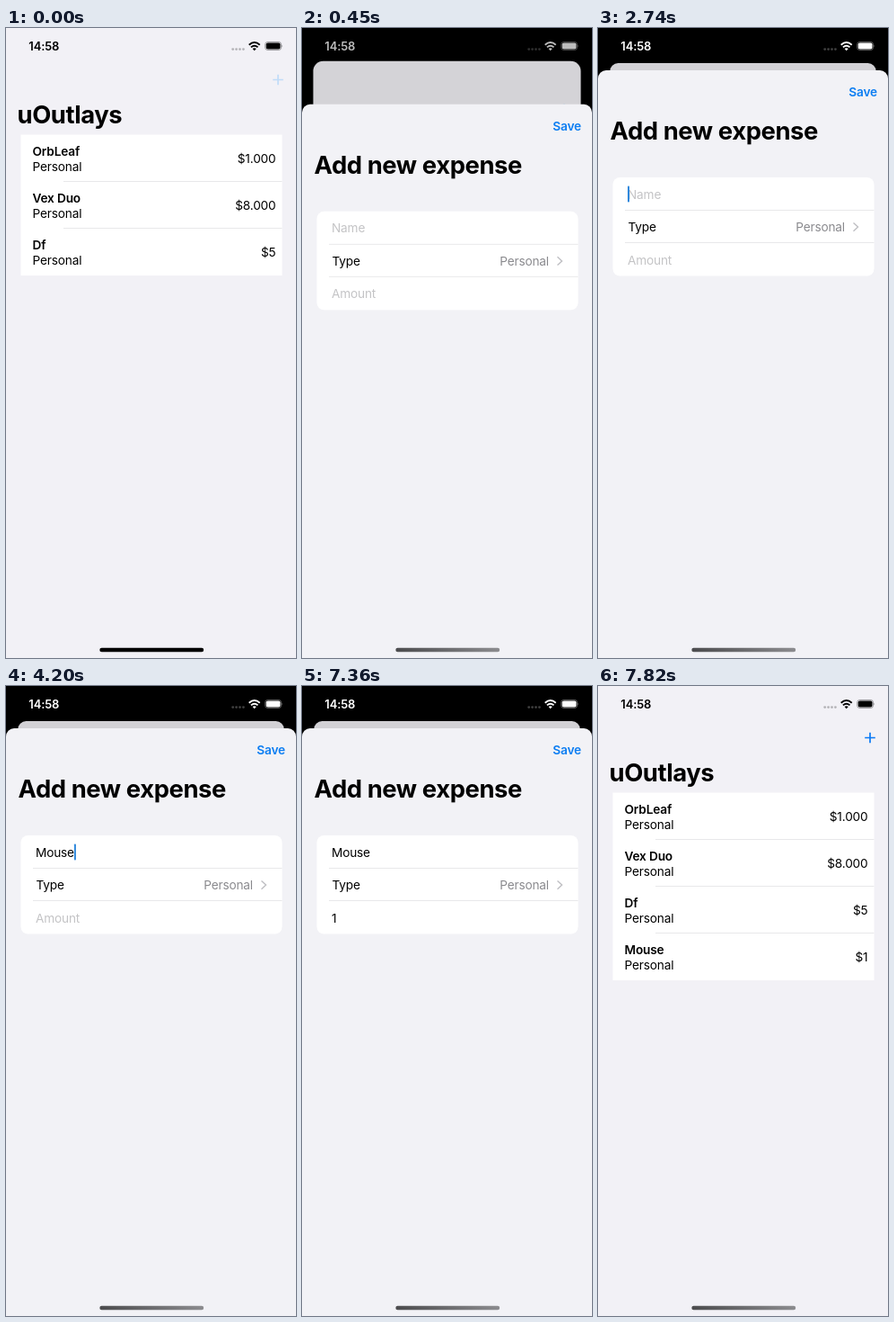
Recreate the animation shown at these times as an HTML page. Size 323 by 700 pixels, loop 8000 ms.

```html
<!DOCTYPE html>
<html lang="en">
<head>
<meta charset="utf-8">
<title>Expense list</title>
<style>
  html, body { margin: 0; width: 100%; height: 100%; overflow: hidden; background: #000; }
  svg { display: block; width: 323px; height: 700px; }
  text {
    font: 13.65px Inter, "Open Sans", sans-serif;
    font-optical-sizing: none;
    letter-spacing: -.012em;
  }
  .title { font-size: 27.4px; font-weight: 700; letter-spacing: -.015em; }
  .bold { font-weight: 600; }
  .end { text-anchor: end; }
  .hint { fill: #c4c4c6; }
  .line { stroke: #e8e8ea; fill: none; }
</style>
</head>
<body>
<svg viewBox="0 0 323 700">
  <defs>
    <linearGradient id="grey">
      <stop offset="0" stop-color="#4c4c4e"/>
      <stop offset="1" stop-color="#8c8c8f"/>
    </linearGradient>
  </defs>

  <g id="list">
    <rect id="page" width="323" height="760" fill="#f2f1f6"/>
    <path id="plus" d="M297.2 57.5h11.6M303 51.7v11.6" stroke-width="1.7"/>
    <text class="title" x="12.5" y="106">uOutlays</text>
    <rect id="table" x="16.5" y="118.5" width="291" fill="#fff"/>
    <g id="rows"></g>
  </g>
  <rect id="dim" width="323" height="700"/>

  <g id="sheet">
    <rect y="47" width="323" height="700" rx="9" fill="#f2f2f6"/>
    <text id="save" class="bold end" x="311" y="76" fill="#0b7df2">Save</text>
    <text class="title" x="13.5" y="124">Add new expense</text>
    <rect x="16.5" y="166" width="291" height="109.5" rx="8" fill="#fff"/>
    <path class="line" d="M30 202.5H307.5M30 238.5H307.5"/>
    <text id="name" x="33" y="189.5"></text>
    <text x="33.5" y="226">Type</text>
    <text class="end" x="275" y="226" fill="#8a8a8e">Personal</text>
    <path d="M284.5 216.5l5 4.6l-5 4.6" fill="none" stroke="#bfbfc3" stroke-width="1.4"/>
    <text id="amount" x="33" y="262.5"></text>
    <rect id="caret" width="2" height="18" rx=".8" fill="#2f88dc"/>
  </g>

  <g id="status">
    <text class="bold" x="25.3" y="25" style="font-size:13px">14:58</text>
    <g opacity=".25">
      <circle cx="252.7" cy="23.6" r="1.4"/><circle cx="256.6" cy="23.6" r="1.4"/>
      <circle cx="260.5" cy="23.6" r="1.4"/><circle cx="264.4" cy="23.6" r="1.4"/>
    </g>
    <g fill="none" stroke="currentColor" stroke-width="1.9">
      <path d="M270.7 18.8Q276.7 13.4 282.7 18.8M272.9 21.4Q276.7 18 280.5 21.4"/>
    </g>
    <path d="M274.6 23Q276.7 21.3 278.8 23L276.7 25.2Z"/>
    <rect x="288.7" y="15.5" width="17.8" height="9" rx="2.8" fill="none" stroke="currentColor" stroke-width=".8" opacity=".45"/>
    <rect x="289.7" y="16.5" width="15.8" height="7" rx="1.8"/>
    <path d="M307.4 18.6q1.4 1.4 0 2.8z" opacity=".45"/>
  </g>

  <rect id="home" x="104.3" y="688.8" width="115.9" height="4.4" rx="2.2"/>
</svg>

<script>
const LOOP = 8000, FRAME = 55, ROW = 52;
const $ = id => document.getElementById(id);
const clamp = v => Math.min(1, Math.max(0, v));
const set = (id, attrs) => {
  for (const key in attrs) $(id).setAttribute(key, attrs[key]);
};

const items = [["OrbLeaf", "$1.000"], ["Vex Duo", "$8.000"], ["Df", "$5"], ["Mouse", "$1"]];
$("rows").innerHTML = items.map(([name, price], i) => `
  <g id="row${i}" transform="translate(0 ${i * ROW})">
    ${i ? `<path id="line${i}" class="line" d="M64 118.5H307.5"/>` : ""}
    <text class="bold" x="29.5" y="141.5">${name}</text>
    <text x="29.5" y="158.5">Personal</text>
    <text class="end" x="300.5" y="150">${price}</text>
  </g>`).join("");

// Times at which text and caret opacity change
const nameKeys = [[0, ""], [3200, "M"], [3410, "Mo"], [3590, "Mou"], [3990, "Mous"], [4200, "Mouse"]];
const amountKeys = [[0, ""], [5880, "1"]];
const caretKeys = [
  [0, 0], [1720, 1], [2310, .5], [2390, 0], [2670, .5], [2740, 1],
  [4740, .67], [4800, .3], [4850, 0], [5120, .5], [5210, 1],
  [6460, .5], [6540, 0], [6780, .3], [6840, .67], [6890, 1], [7290, 0]
];
const valueAt = (keys, t) => keys.filter(k => k[0] <= t).pop()[1];

// Critically damped spring, 0 to 1
const spring = ms => {
  const x = Math.max(0, ms) * .01826;
  return 1 - (1 + x) * Math.exp(-x);
};
const snap = (t, base) => base + Math.floor((t - base) / FRAME) * FRAME;

function sheetProgress(t) {
  if (t < 230 || t >= 7810) return 0;
  if (t < 7300) return t >= 680 ? 1 : spring(snap(t, 450) - 200);
  return 1 - spring(snap(t, 7480) - 7346);
}

function field(id, value, hint) {
  $(id).textContent = value || hint;
  $(id).setAttribute("class", value ? "" : "hint");
  return value ? $(id).getComputedTextLength() : 0;
}

function draw(t) {
  const p = sheetProgress(t), scale = 1 - .082 * p, added = t > 2000;
  set("list", { transform: `translate(${161.5 * (1 - scale)} ${39 * p}) scale(${scale})` });
  set("page", { rx: p ? 47 - 37 * p : 0 });
  set("dim", { opacity: .135 * p });
  set("sheet", { transform: `translate(0 ${653 * (1 - p)})`, visibility: p ? "visible" : "hidden" });
  set("plus", { stroke: t < 700 ? "#c0dcf8" : "#0a7af5" });
  set("table", { height: ROW * (added ? 4 : 3) + .5 });
  set("row3", { visibility: added ? "visible" : "hidden" });
  set("line3", { opacity: t > 7600 ? 1 : 0 });
  set("save", { opacity: t >= 7080 && t < 7290 ? .3 : 1 });

  const nameWidth = field("name", valueAt(nameKeys, t), "Name");
  const amountWidth = field("amount", valueAt(amountKeys, t), "Amount");
  const inName = t < 5370;
  set("caret", {
    x: 33 + (inName ? nameWidth : amountWidth),
    y: inName ? 175.5 : 248.5,
    opacity: valueAt(caretKeys, t)
  });

  const light = 255 * (t < 4000 ? clamp((t - 200) / 340) : 1 - clamp((t - 7420) / 300));
  const ink = `rgb(${light},${light},${light})`;
  set("status", { fill: ink, color: ink });
  set("home", { fill: t < 230 ? "#000" : "url(#grey)" });
}

const start = performance.now();
function tick() {
  draw((performance.now() - start) % LOOP);
  requestAnimationFrame(tick);
}
tick();
</script>
</body>
</html>
```
